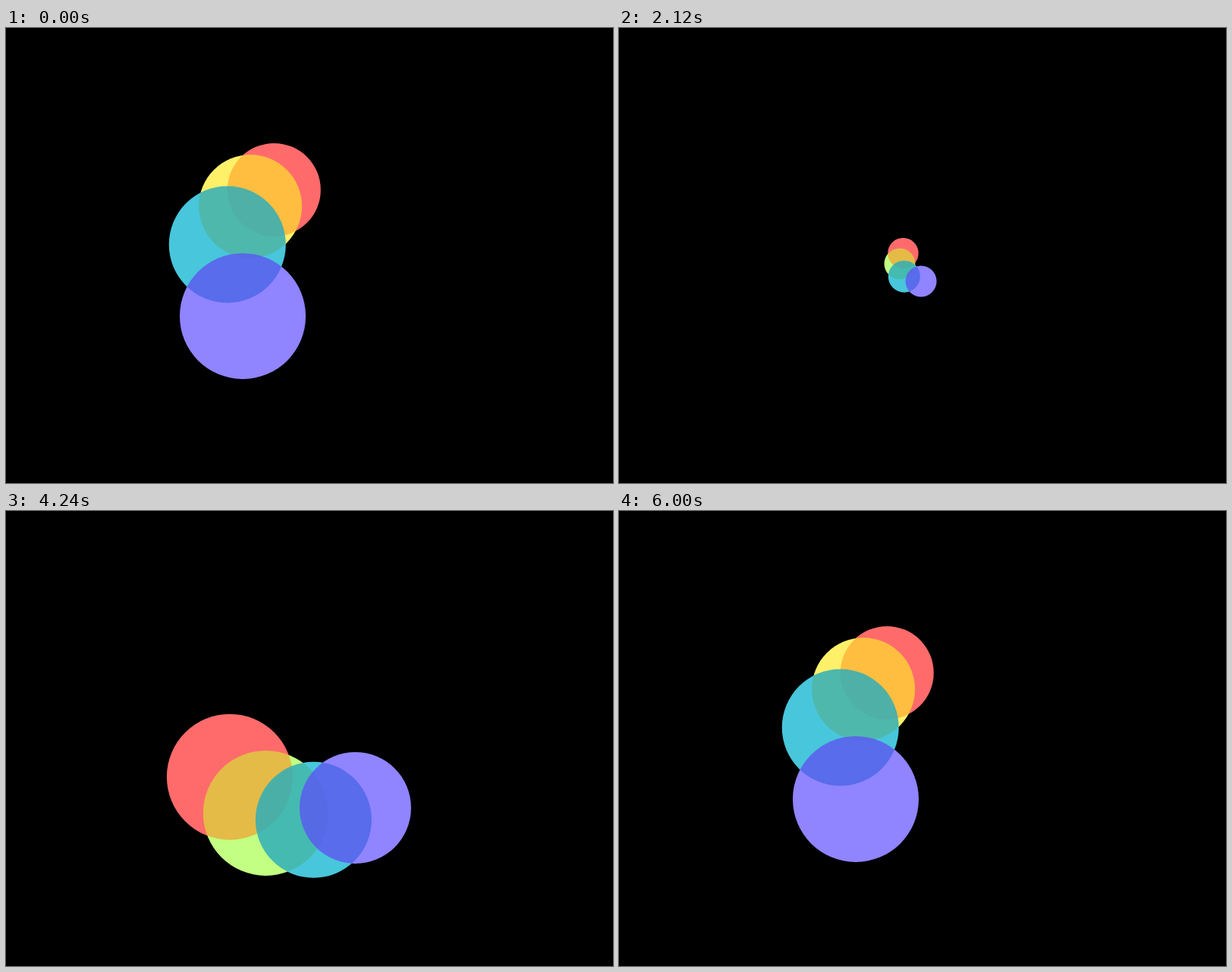
Write an HTML page with a canvas that moves like this. It is 800 by 600 pixels and loops after 6.24 s.

```html
<!DOCTYPE html>
<html lang="en">
<head>
<meta charset="utf-8">
<title>Orbiting circles</title>
<style>
  html, body { margin: 0; width: 100%; height: 100%; overflow: hidden; background: #000; }
  canvas { display: block; width: 800px; height: 600px; }
</style>
</head>
<body>
<canvas id="stage" width="800" height="600"></canvas>
<script>
const ctx = document.getElementById('stage').getContext('2d');
const LOOP = 6240, LAST = 6000, STEP = 40, TURN = 1000, START = 760;
const CENTER = [393, 307], PIVOT = [395.8, 310.9];

// Within one turn: angle in degrees counterclockwise from the top, and radius.
const TIMES = [760, 840, 1000, 1040, 1120, 1240, 1560, 1640, 1760];
const END_ANGLES = [308.7, 335, 351], END_RADII = [34, 34, 34];
const circles = [
  { angles: [-5, 23, 29, 58, 114], radii: [36, 61.5, 68, 77, 83],
    fill: [255, 107, 107], over: [255, 107, 107], alpha: 1 },
  { angles: [2, 44.6, 57, 92, 151], radii: [38, 68, 73, 77.5, 82.5],
    fill: [255, 240, 106], over: [255, 190, 64], alpha: 1,
    lateFill: [194, 255, 130], lateOver: [228, 187, 70] },
  { angles: [14, 78, 93.5, 132.6, 187], radii: [41, 77, 78, 80, 76.5],
    fill: [72, 198, 219], over: [47, 174, 184], alpha: 0.85 },
  { angles: [31, 132, 152, 187, 218.6], radii: [46, 83, 81.5, 78, 73.5],
    fill: [144, 132, 255], over: [91, 92, 240], alpha: 0.85 }
];

const clamp = x => Math.min(1, Math.max(0, x));
const smooth = (a, b, t) => { const x = clamp((t - a) / (b - a)); return x * x * (3 - 2 * x); };
const mix = (a, b, k) => a.map((v, i) => v + (b[i] - v) * k);
const rgba = (c, a) => `rgba(${c.map(Math.round).join(',')},${a})`;

// Monotone cubic curve through the given points.
function curve(xs, ys) {
  const n = xs.length;
  const d = xs.slice(1).map((x, i) => (ys[i + 1] - ys[i]) / (x - xs[i]));
  const m = xs.map((_, i) => {
    if (i === 0 || i === n - 1) return 0;
    const p = d[i - 1] * d[i];
    return p > 0 ? 2 * p / (d[i - 1] + d[i]) : 0;
  });
  return x => {
    let i = 0;
    while (i < n - 2 && x > xs[i + 1]) i++;
    const h = xs[i + 1] - xs[i], u = clamp((x - xs[i]) / h), v = 1 - u;
    return ys[i] * v * v * (1 + 2 * u) + ys[i + 1] * u * u * (3 - 2 * u)
      + h * u * v * (m[i] * v - m[i + 1] * u);
  };
}

const orbit = curve(
  [-9, 23, 44.6, 78, 114, 132, 151, 187, 218.6, 308.7, 351],
  [103, 101.7, 101, 103.5, 107.4, 109, 104.5, 101, 108, 100.6, 103]);

for (const c of circles) {
  c.angleAt = curve(TIMES, [-9, ...c.angles, ...END_ANGLES]);
  c.radiusAt = curve(TIMES, [34, ...c.radii, ...END_RADII]);
}

const zoomAt = t => 1 - 0.76 * (smooth(520, 1000, t) - smooth(3080, 3560, t));

function drawCircle(c, t, zoom) {
  const turnTime = START + (t - START + TURN) % TURN;
  const deg = c.angleAt(turnTime), rad = deg * Math.PI / 180, dist = orbit(deg);
  const x = PIVOT[0] + (CENTER[0] - dist * Math.sin(rad) - PIVOT[0]) * zoom;
  const y = PIVOT[1] + (CENTER[1] - dist * Math.cos(rad) - PIVOT[1]) * zoom;
  const r = c.radiusAt(turnTime) * (0.03 + 0.97 * zoom);

  let { fill, over } = c;
  if (c.lateFill) {
    const k = clamp((deg - 47) / 35) * clamp((340 - deg) / 30);
    fill = mix(fill, c.lateFill, k);
    over = mix(over, c.lateOver, k);
  }
  ctx.beginPath();
  ctx.arc(x, y, r, 0, 2 * Math.PI);
  // Tint what lies below, then fill the free part.
  ctx.globalCompositeOperation = 'source-atop';
  ctx.fillStyle = rgba(over, c.alpha);
  ctx.fill();
  ctx.globalCompositeOperation = 'destination-over';
  ctx.fillStyle = rgba(fill, 1);
  ctx.fill();
}

function render(ms) {
  const t = Math.min(LAST, Math.floor(ms % LOOP / STEP) * STEP);
  ctx.clearRect(0, 0, 800, 600);
  const zoom = zoomAt(t);
  for (const c of circles) drawCircle(c, t, zoom);
}

const begin = performance.now();
function tick() {
  render(Math.max(0, performance.now() - begin));
  requestAnimationFrame(tick);
}
tick();
</script>
</body>
</html>
```
